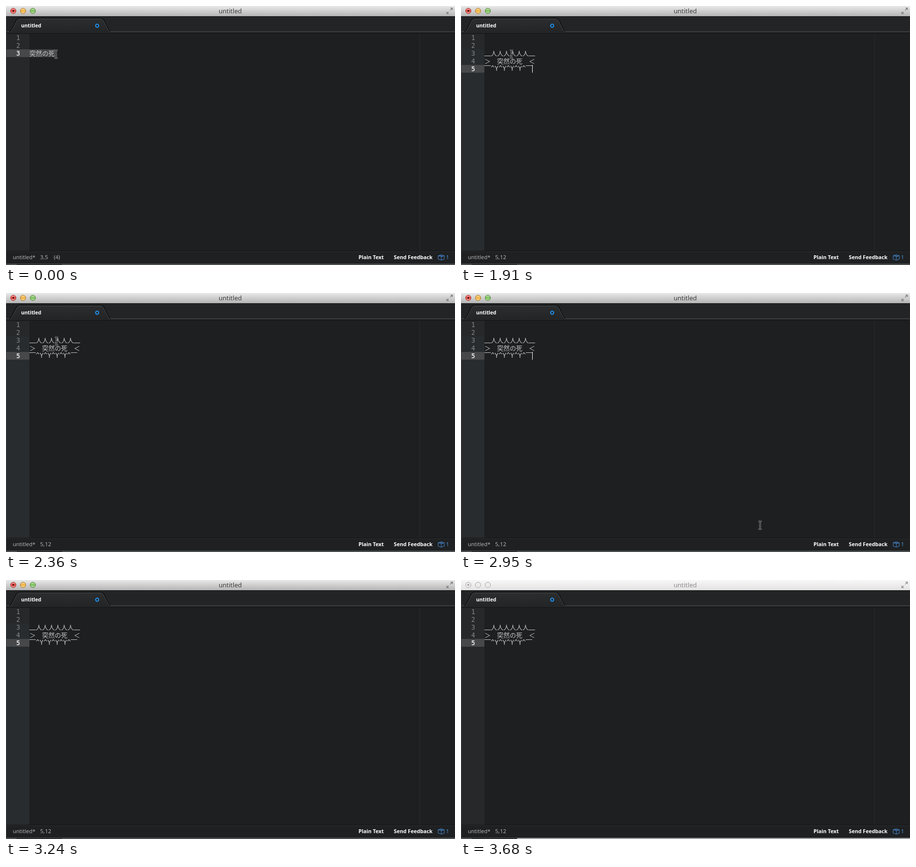
Animation of 921x532 px, one loop 3.75 s. Source, as an HTML page:

```html
<!DOCTYPE html>
<html lang="ja">
<head>
<meta charset="utf-8">
<title>untitled</title>
<style>
html, body { margin: 0; width: 100%; height: 100%; overflow: hidden; background: #1d1f21; }
svg { display: block; width: 921px; height: 532px; }
text { white-space: pre; }
.ui { font: 11px "Noto Sans", "Open Sans", sans-serif; fill: #b0b3b5; }
.bold { font-weight: 700; font-size: 10.7px; fill: #fff; }
.mono { font: 13.29px "DejaVu Sans Mono", monospace; fill: #c5c8c6; }
.num { fill: #85888a; }
.num.on { fill: #dcdedf; font-weight: 700; }
.cjk { font: 13px "Noto Sans CJK JP", "Noto Sans CJK", sans-serif; fill: #c5c8c6; }
</style>
</head>
<body>
<svg viewBox="0 0 921 532" xmlns="http://www.w3.org/2000/svg">
  <defs>
    <linearGradient id="barOn" x2="0" y2="1"><stop stop-color="#e9e9e9"/><stop offset="1" stop-color="#b4b4b4"/></linearGradient>
    <linearGradient id="barOff" x2="0" y2="1"><stop stop-color="#f8f8f8"/><stop offset="1" stop-color="#e2e2e2"/></linearGradient>
    <linearGradient id="tabFill" x2="0" y2="1"><stop stop-color="#2b2d2e"/><stop offset="1" stop-color="#232526"/></linearGradient>
    <linearGradient id="shine" x2="0" y2="1"><stop stop-color="#fff" stop-opacity=".55"/><stop offset=".5" stop-color="#fff" stop-opacity="0"/><stop offset="1" stop-color="#fff" stop-opacity=".5"/></linearGradient>
  </defs>

  <!-- title bar -->
  <rect id="bar" width="921" height="21" fill="url(#barOn)"/>
  <g id="lights"></g>
  <text id="title" class="ui" x="460" y="15" text-anchor="middle" style="font-size:13px">untitled</text>
  <g id="expand" fill="#858585" stroke="#858585" stroke-width="1.6">
    <path d="M911 9l4-4M908 12l-4 4" fill="none"/>
    <path d="M911 3.5h5.5V9zM903.500 11v5.500H909z" stroke="none"/>
  </g>

  <!-- tabs -->
  <rect y="21" width="921" height="36" fill="#222425"/>
  <rect y="21" width="921" height="1" fill="#151718"/>
  <path d="M0 52.500H9M213 52.500H921" stroke="#4b4d4e"/>
  <path d="M7 52.500C12 51 16 39 20 31.500Q22.500 25.500 28 25.500H194Q199.500 25.500 202 31.500C206 39 210 51 214 52.500" fill="none" stroke="#0f1011" stroke-width="2"/>
  <path d="M9 53C14 49 18 38 21.500 31.500Q24 26.500 29 26.500H193Q198 26.500 200.500 31.500C204 38 208 49 213 53" fill="url(#tabFill)" stroke="#4b4d4e"/>
  <rect x="1" y="53" width="920" height="3" fill="#232526"/>
  <rect y="56" width="921" height="1" fill="#0f1112"/>
  <text class="ui bold" x="31" y="44" style="font-size:10.3px">untitled</text>
  <circle cx="187" cy="40.500" r="3.200" fill="none" stroke="#2090ee" stroke-width="2"/>

  <!-- editor -->
  <rect y="57" width="921" height="446" fill="#1d1f21"/>
  <rect y="57" width="48" height="446" fill="#262829"/>
  <rect id="tint" y="89" width="48" height="414" fill="#282c2e"/>
  <rect x="848" y="57" width="1" height="446" fill="#27292b"/>
  <rect id="row" width="48" height="16" fill="#46484a"/>
  <g id="nums"></g>

  <g id="before">
    <rect x="48" y="89" width="52" height="16" fill="#444648"/>
    <text class="cjk" x="48" y="102">突然の死</text>
  </g>
  <g id="after">
    <path d="M48 102.500h13M139 102.500h13M48 122.500h13M133 122.500h13" stroke="#c5c8c6"/>
    <text class="cjk" x="61" y="102">人人人人人人</text>
    <text class="cjk" x="48" y="118">＞　突然の死　＜</text>
    <text class="mono" x="61" y="133">^Y^Y^Y^Y^</text>
  </g>
  <rect id="caret" x="146" y="121" width="1" height="16" fill="#fff"/>

  <!-- status bar -->
  <rect y="503" width="921" height="29" fill="#1e2022"/>
  <rect y="503" width="921" height="1" fill="#0f1112"/>
  <rect y="504" width="921" height="1" fill="#2f3133"/>
  <text class="ui" x="14" y="520">untitled*</text>
  <text id="pos" class="ui" x="70" y="520" style="font-size:11.5px"></text>
  <text id="count" class="ui" x="98" y="520">(4)</text>
  <text class="ui bold" x="723" y="520">Plain Text</text>
  <text class="ui bold" x="795.500" y="520">Send Feedback</text>
  <path d="M886.500 513l6.500-2 6 2v7l-6 2-6.500-2zM886.500 513l6.500 2 6-2M893 515v7M889.500 512l6.500 2" fill="none" stroke="#4687cc"/>
  <text class="ui" x="902.500" y="520" style="fill:#5293d8">1</text>

  <!-- window edge -->
  <rect y="21" width="1" height="511" fill="#3c3e3f"/>
  <rect y="529" width="921" height="1" fill="#45484a"/>
  <rect y="530" width="921" height="2" fill="#4a4e4f"/>
  <rect id="edge" x="115" y="530" width="806" height="2"/>
  <rect x="22" y="530" width="93" height="2" fill="#2a2c2d"/>

  <g id="mouse" fill="none">
    <path id="beam" d="M-3.500-8H-2Q0-8 0-6V6Q0 8-2 8H-3.500M3.500-8H2Q0-8 0-6M0 6Q0 8 2 8H3.500M-2 1H2" stroke="#8b8d8e" stroke-width="2.600"/>
    <use href="#beam" style="stroke:#111"/>
    <path d="M-3.500-8H-2Q0-8 0-6V6Q0 8-2 8H-3.500M3.500-8H2Q0-8 0-6M0 6Q0 8 2 8H3.500M-2 1H2" stroke="#151617"/>
  </g>
</svg>
<script>
const $ = id => document.getElementById(id);
const show = (id, on) => $(id).setAttribute("visibility", on ? "visible" : "hidden");
const LOOP = 3750;

// start time, pointer position, expanded text, caret, window active
const steps = [
  [0,    [102.5, 99],  0, 0, 1],
  [150,  [103.5, 99],  0, 0, 1],
  [1910, [103.5, 99],  1, 1, 1],
  [2360, [103.5, 99],  1, 0, 1],
  [2800, [230.5, 161], 1, 1, 1],
  [2950, [613.5, 477], 1, 1, 1],
  [3100, null,         1, 1, 1],
  [3240, null,         1, 0, 1],
  [3540, null,         1, 1, 1],
  [3680, null,         1, 0, 0]
];

const lightColors = [["#e8483f", "#9c3029"], ["#f0b13c", "#a3762a"], ["#79bd57", "#4f8339"]];

function drawLights(active) {
  $("lights").innerHTML = lightColors.map(([fill, edge], i) => {
    const at = `cx="${15 + i * 20}" cy="10"`;
    const dot = i ? "" : `<circle ${at} r="2" fill="${active ? "#5a0f0c" : "#a0a0a0"}"/>`;
    return `<circle ${at} r="5.5" fill="${active ? fill : "#ededed"}" stroke="${active ? edge : "#a6a6a6"}"/>` +
      (active ? `<circle ${at} r="4.8" fill="url(#shine)"/>` : "") + dot;
  }).join("");
}

function drawNumbers(last) {
  let out = "";
  for (let n = 1; n <= last; n++)
    out += `<text class="mono num${n === last ? " on" : ""}" x="21" y="${54 + n * 16}">${n}</text>`;
  $("nums").innerHTML = out;
}

function render([, mouse, expanded, caret, active]) {
  const last = expanded ? 5 : 3;
  drawLights(active);
  drawNumbers(last);
  $("bar").setAttribute("fill", active ? "url(#barOn)" : "url(#barOff)");
  $("title").style.fill = active ? "#3c3c3c" : "#8c8c8c";
  $("expand").setAttribute("opacity", active ? 1 : 0.8);
  $("edge").setAttribute("fill", active ? "#4a4e4f" : "#a4a8a9");
  $("row").setAttribute("y", 41 + last * 16);
  $("pos").textContent = expanded ? "5,12" : "3,5";
  show("before", !expanded);
  show("after", expanded);
  show("count", !expanded);
  show("tint", expanded && active);
  show("caret", caret);
  show("mouse", mouse);
  if (mouse) $("mouse").setAttribute("transform", `translate(${mouse})`);
}

let current;
function tick() {
  const t = performance.now() % LOOP;
  const step = steps.findLast(s => s[0] <= t);
  if (step !== current) render(current = step);
  requestAnimationFrame(tick);
}
tick();
</script>
</body>
</html>
```
